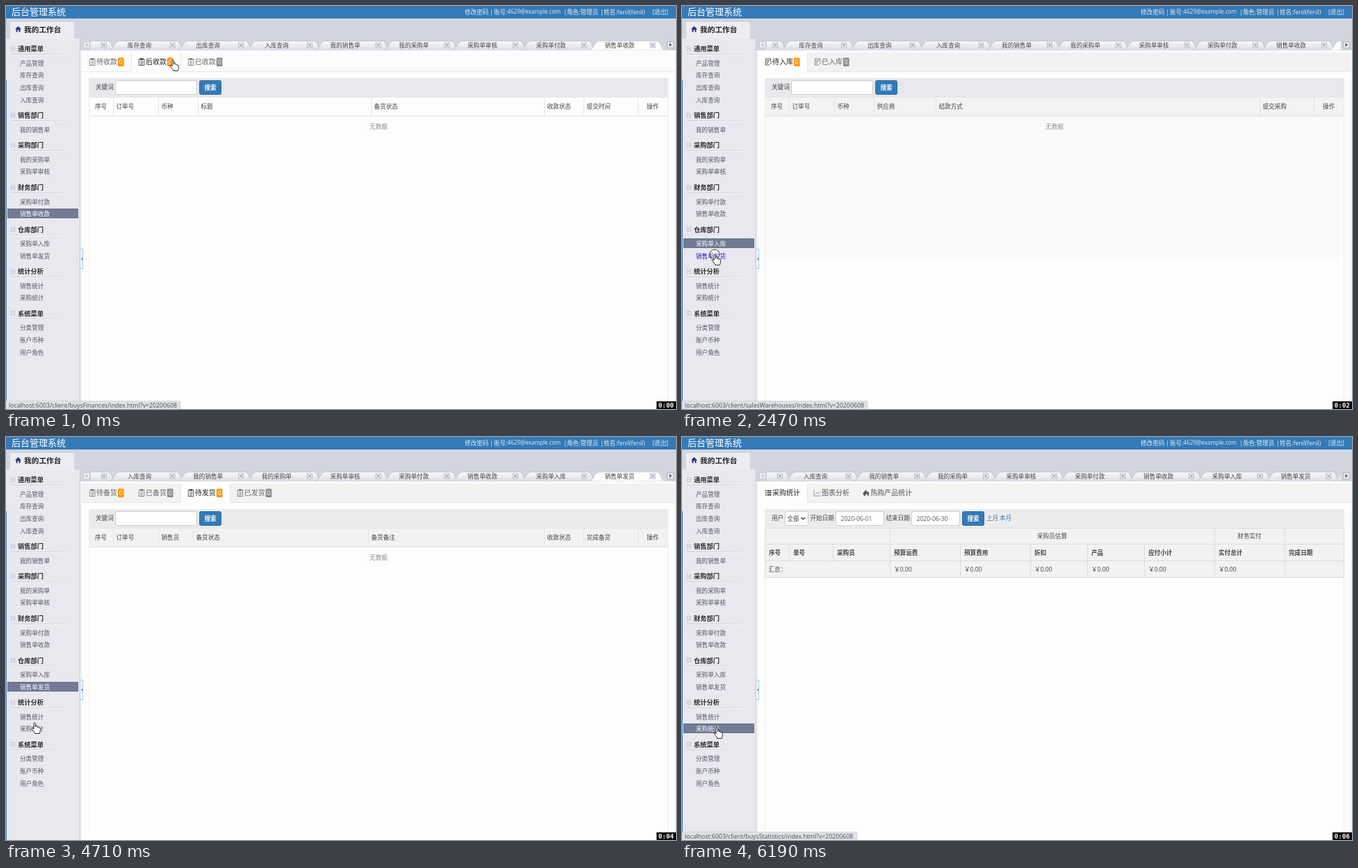
Recreate the animation shown at these times as an HTML page. Size 964 by 581 pixels, loop 6.29 s.

```html
<!DOCTYPE html>
<html lang="zh-CN">
<head>
<meta charset="utf-8">
<title>后台管理系统</title>
<style>
html, body { margin: 0; width: 100%; height: 100%; overflow: hidden; background: #fff; }
svg { display: block; width: 964px; height: 581px; }
text { font-family: "Open Sans", "Noto Sans CJK SC", "Noto Sans CJK", sans-serif; white-space: pre; }
.mono { font-family: "DejaVu Sans Mono", monospace; }
</style>
</head>
<body>
<svg id="stage" viewBox="0 0 964 581">
  <defs>
    <linearGradient id="tabFill" x1="0" y1="0" x2="0" y2="1">
      <stop offset="0" stop-color="#fafafc"/><stop offset="1" stop-color="#dcdee6"/>
    </linearGradient>
    <linearGradient id="rule">
      <stop offset="0" stop-color="#c9ccd6"/><stop offset="1" stop-color="#dfe1e8"/>
    </linearGradient>
    <clipPath id="tabClip"><rect x="122" y="47" width="826" height="20"/></clipPath>
  </defs>
  <g id="frame"></g><g id="menu"></g><g id="tabs"></g><g id="page"></g><g id="over"></g>
</svg>
<script>
const LOOP = 6290, PITCH = 98.7, BLUE = '#337ab7', LINE = '#dcdce0';
const $ = id => document.getElementById(id);

const text = (x, y, s, o = {}) => {
  const size = o.size || 8.6;
  return `<text x="${x}" y="${y + size * .37}" font-size="${size}" fill="${o.fill || '#444'}"` +
    ` font-weight="${o.weight || 400}" text-anchor="${o.anchor || 'start'}"${o.cls ? ` class="${o.cls}"` : ''}>${s}</text>`;
};
const rect = (x, y, w, h, fill, extra = '') =>
  `<rect x="${x}" y="${y}" width="${w}" height="${h}" fill="${fill}" ${extra}/>`;
const path = (d, stroke, fill = 'none', w = 1) =>
  `<path d="${d}" stroke="${stroke}" fill="${fill}" stroke-width="${w}"/>`;
const vline = (x, y1, y2, c = LINE) => path(`M${Math.floor(x) + .5} ${y1}V${y2}`, c);
const hline = (y, x1, x2, c = LINE) => path(`M${x1} ${y + .5}H${x2}`, c);

const TICKS = [0, 210, 420, 640, 740, 950, 1170, 1390, 1600, 1820, 2040, 2250, 2470, 2690, 2900, 3110,
  3330, 3540, 3760, 3970, 4070, 4290, 4500, 4710, 4920, 5140, 5240, 5450, 5670, 5880, 6090, 6190];
const last = (list, t) => list.filter(k => k[0] <= t).pop();
const lerp = (list, t) => {
  const a = last(list, t), b = list[list.indexOf(a) + 1] || a;
  const k = b === a ? 0 : (t - a[0]) / (b[0] - a[0]);
  return a.map((v, i) => v + (b[i] - v) * k);
};

const MENU = [
  [62, '通用菜单', ['产品管理', '库存查询', '出库查询', '入库查询']],
  [158, '销售部门', ['我的销售单']],
  [201, '采购部门', ['我的采购单', '采购单审核']],
  [262, '财务部门', ['采购单付款', '销售单收款']],
  [322.5, '仓库部门', ['采购单入库', '销售单发货']],
  [383, '统计分析', ['销售统计', '采购统计']],
  [443.5, '系统菜单', ['分类管理', '账户币种', '用户角色']]
];
const TITLES = MENU.slice(0, 6).flatMap(g => g[2]);

// Timeline: time, value
const SELECTED = [[0, '销售单收款'], [2250, '采购单入库'], [2690, '销售单发货'], [5140, '销售统计'], [5670, '采购统计']];
const HOVER = [[0, ''], [2040, '采购单入库'], [2250, ''], [2470, '销售单发货'], [2690, ''], [4920, '销售统计'],
  [5140, ''], [5450, '采购统计'], [5670, '']];
const PAGE = [[0, 'collect', 1], [740, 'collect', 2], [2250, 'stock', 0], [2900, 'ship', 0], [3760, 'ship', 1],
  [4290, 'ship', 2], [5140, 'sales', 0], [5880, 'buys', 0]];
const STATUS = [[0, 'buysFinances'], [1600, 'buysWarehouses'], [2470, 'salesWarehouses'], [2900, 'salesStatistics'],
  [3540, ''], [4920, 'salesStatistics'], [5450, 'buysStatistics']];
const SCROLL = [[0, 0], [2250, 0], [2470, 6.5], [2690, PITCH], [3110, PITCH], [3330, 137.5], [3540, 2 * PITCH]];
const OPENED = [[0, 9], [2250, 10], [2900, 11], [5140, 12], [5880, 13]];
const POINTER = [[0, 239, 78], [420, 265, 78], [740, 303, 78], [1170, 298, 84], [1390, 215, 190], [1600, 98, 310],
  [1820, 51, 345], [2040, 46, 341], [2250, 46, 345], [2470, 46, 358], [2690, 46, 358], [2900, 50, 385],
  [3110, 170, 250], [3330, 286, 138], [3540, 220, 78], [3970, 220, 78], [4070, 285, 78], [4290, 288, 78],
  [4500, 160, 260], [4710, 40, 412], [4920, 40, 403], [5240, 40, 403], [5450, 38, 419], [5670, 38, 419], [6190, 49, 419]];
const SHAPE = [[0, 'hand'], [1390, 'arrow'], [2040, 'hand'], [3110, 'arrow'], [3540, 'hand'], [4500, 'arrow'], [4710, 'hand']];

function drawFrame() {
  let s = rect(0, 0, 964, 581, '#fdfdfd') + rect(0, 18, 964, 47, '#d2d5df') + rect(0, 0, 964, 18, BLUE);
  s += text(8, 8, '后台管理系统', { size: 13, fill: '#fff' });
  const top = (x, v, size) => text(x, 8.5, v, { fill: '#e4eef7', size });
  s += top(660, '修改密码') + top(696, '|') + top(702, '账号:') + top(721.5, '4629@example.com', 8.1) + top(802, '|') +
    top(807, '角色:管理员') + top(855, '|') + top(860, '姓名:fenil(fenil)') + top(930, '[退出]');
  s += rect(0, 47, 107, 534, '#e8e8ee') + path('M6 48V25q0-2 2-2H96q2 0 2 2V48Z', 'none', '#ececf1');
  s += path('M13 33.5L17.5 29L22 33.5H20.5V37.5H18.5V34.5H16.5V37.5H14.5V33.5Z', 'none', '#27357c');
  s += text(26, 34, '我的工作台', { size: 10.7, weight: 700, fill: '#222' });
  s += rect(0, 107, 1, 474, '#3d80bd') + vline(106, 47, 581, '#c6c9d3') + vline(108, 67, 581, '#ececef');
  s += rect(106.5, 350.5, 4, 28, '#fff', 'stroke="#a9c4e2"') + path('M110 362.5L108 364.5L110 366.5Z', 'none', BLUE);
  return s + vline(962, 67, 581, '#eee');
}

function drawMenu(chosen, hover) {
  let s = '';
  for (const [y, name, items] of MENU) {
    s += rect(7.5, y - 3, 5, 5, '#f5f5f8', 'stroke="#b4b8c6" stroke-width=".8"') + path(`M8.8 ${y - .5}h2.5`, '#8088a0', 'none', .8);
    s += text(17, y, name, { size: 9.25, weight: 700, fill: '#2a2b30' }) + rect(7, y + 7, 82, 1, 'url(#rule)') +
      rect(7, y + 8, 82, 1, '#f3f3f7');
    items.forEach((item, i) => {
      const iy = y + 20.5 + i * 17.7, on = item === chosen;
      if (on) s += rect(2.5, Math.round(iy) - 7.5, 101, 13, '#717b95', 'stroke="#69728c"');
      s += text(20, iy, item, { fill: on ? '#fff' : item === hover ? '#2020b8' : '#535769' });
    });
  }
  return s;
}

function drawTabs(scroll, count, chosen) {
  let s = '';
  const tab = i => {
    const c = 192 + PITCH * (i - 1) - scroll, on = TITLES[i] === chosen;
    if (c < 0 || c > 1020) return '';
    const d = `M${c - 43} 63.5C${c - 36} 62 ${c - 37} 50.5 ${c - 28} 50.5H${c + 53}C${c + 60} 50.5 ${c + 58} 62 ${c + 65} 63.5`;
    return path(d, on ? '#c9ccd6' : '#b9bdca', on ? '#fdfdfd' : 'url(#tabFill)', .8) + text(c, 57, TITLES[i], { anchor: 'middle' }) +
      rect(c + 44, 53, 7, 7, '#f4f4f8', 'stroke="#a5aabb" stroke-width=".8"') +
      path(`M${c + 45.7} 54.7l3.6 3.6m0-3.6l-3.6 3.6`, '#6a7085', 'none', 1);
  };
  const order = [...Array(count).keys()].sort((a, b) => (TITLES[a] === chosen) - (TITLES[b] === chosen));
  s += rect(107, 63, 857, 4, '#fdfdfd') + hline(63, 107, 964, '#cfd1da');
  s += `<g clip-path="url(#tabClip)">${order.map(tab).join('')}</g>`;
  const button = (x, dir, edge, c) => rect(x + .5, 51.5, 9, 9, '#e9eaf0', `stroke="${edge}" stroke-width=".8"`) +
    path(`M${x + 5 + 2 * dir} 56l${-3.5 * dir} -2.7v5.4Z`, 'none', c);
  return s + button(111, -1, '#c4c8d2', '#c0c4cf') + button(951, 1, '#a8adbd', '#4f576e');
}

const ICONS = {
  clip: (x, c) => path(`M${x} 76.5h7.5v9h-7.5ZM${x + 2} 75.5h3.5v2h-3.5ZM${x + 2} 80h4m-4 2h4m-4 2h3`, c, 'none', .75),
  edit: (x, c) => path(`M${x} 76h7v4m-2 5h-5v-9m1.5 2.5h4m-4 2h3m-3 2h2m2 2l4-4.5`, c, 'none', .8),
  list: (x, c) => path(`M${x} 77.5h1.5m1 0h6m-8.5 3h1.5m1 0h6m-8.5 3h1.5m1 0h6`, c, 'none', 1.4),
  chart: (x, c) => path(`M${x} 76v9h9.5M${x + 1.5} 83l2.5-3l2 1.5l3.5-4`, c, 'none', .8),
  fire: (x, c) => path(`M${x + 4} 75.5c1 3 2 2 2.4 4c.5-.4.8-1.2.8-1.8c2 2.5 3 5.4 0 7.8c.7-2-1-2.5-1.7-4.2c-1 2-2.5 2-1.7 4.2c-4-2-4-4.2-1.7-6.4c1.2-1.2 1.8-2 1.9-3.6Z`, 'none', c)
};

const VIEWS = {
  collect: {
    row: '#fcfcfc', bar: '#e8e8ed', head: '#fdfdfd', icon: 'clip',
    tabs: [['待收款', 1], ['后收款', 1], ['已收款', 0]],
    cols: [[154, '订单号'], [219, '币种'], [276, '标题'], [525, '备货状态'], [774, '收款状态'], [831, '提交时间']]
  },
  stock: {
    row: '#f2f2f3', bar: '#e8e8ed', head: '#f3f3f3', icon: 'edit',
    tabs: [['待入库', 1], ['已入库', 0]],
    cols: [[154, '订单号'], [219, '币种'], [276, '供应商'], [365, '结款方式'], [831, '提交采购']]
  },
  ship: {
    row: '#f2f2f2', bar: '#ebebeb', head: '#f2f2f2', icon: 'clip',
    tabs: [['待备货', 1], ['已备货', 0], ['待发货', 1], ['已发货', 0]],
    cols: [[154, '订单号'], [219, '销售员'], [269, '备货状态'], [521, '备货备注'], [774, '收款状态'], [831, '提交时间']]
  },
  sales: {
    lead: '销量统计', hot: '热售产品统计', bg: '#f3f3f3', zero: '0.00', first: 3, shift: 0, groups: [[260, 571, '销售员估算'], [571, 867, '财务实收']],
    cols: [[119, '序号'], [154, '单号'], [200, '业务员'], [260, '预算运费'], [333, '预算费用'], [406, '折扣'], [452, '产品'],
      [498, '应收小计'], [571, '收款总计'], [645, '实付运费'], [719, '收款费用'], [793, '实收总计'], [867, '完成日期']]
  },
  buys: {
    lead: '采购统计', hot: '热购产品统计', bg: '#fdfdfd', zero: '￥0.00', first: 3, shift: 17, groups: [[299, 766, '采购员估算'], [766, 867, '财务实付']],
    cols: [[119, '序号'], [154, '单号'], [217, '采购员'], [299, '预算运费'], [400, '预算费用'], [501, '折扣'], [583, '产品'],
      [665, '应付小计'], [766, '实付总计'], [867, '完成日期']]
  }
};

const field = (x, w, fill = '#fff') => rect(x + .5, 107.5, w - 1, 20, fill, 'rx="2" stroke="#ccccd2"');
const search = x => rect(x + .5, 107.5, 31, 20, BLUE, 'rx="2" stroke="#2e6da4"') +
  text(x + 16, 117.5, '搜索', { fill: '#fff', weight: 700, anchor: 'middle' });
const frameLines = () => vline(119, 104, 569, '#ececee') + vline(952, 104, 569, '#ececee');

function pageRow(fill, active, on = '#fefefe') {
  const x = 109 + active * 71;
  return rect(109, 67, 853, 27, fill) + hline(94, 109, 962, '#e8e8e8') +
    rect(x, 67, 71.5, 28, on) + vline(x + 71, 67, 94, '#e6e6e6') + (active ? vline(x, 67, 94, '#e6e6e6') : '');
}

function drawList(v, kind, active) {
  let s = pageRow(v.row, active);
  if (kind === 'collect' && active === 2) s += rect(180, 67, 71, 27, '#f1f1f2');
  v.tabs.forEach(([name, hot], i) => {
    const x = 120 + i * 70.9, c = i === active ? '#222' : '#666';
    s += ICONS[v.icon](x + .5, c) + text(x + 10, 80.5, name, { size: 10, fill: c });
    s += rect(x + 41, 74.5, 8.6, 12.5, hot ? '#ff9800' : '#8e8e8e', 'rx="1.5"') +
      text(x + 45.3, 81, '0', { size: 8.6, fill: '#fff', anchor: 'middle' });
  });
  s += rect(119, 104, 834, 27, v.bar) + text(129, 117, '关键词') + field(157, 118) + search(278);
  s += rect(119, 131, 834, 28, v.head);
  if (kind === 'stock') s += rect(119, 159, 828, 206, '#fafafa');
  s += hline(131, 119, 953, '#e6e6e9') + hline(158, 119, 953, '#dedee3') + frameLines() + text(128, 144.5, '序号');
  for (const [x, name] of v.cols) {
    const label = kind === 'ship' && active === 2 && x === 831 ? '完成备货' : name;
    s += vline(x, 132, 158, '#e4e4e8') + text(x + 4.5, 144.5, label);
  }
  s += vline(909, 132, 158, '#e4e4e8') + text(922, 144.5, '操作');
  return s + text(536, 173.5, '无数据', { fill: '#8c8c8c', anchor: 'middle' });
}

function drawStats(v, kind) {
  const d = v.shift, full = kind === 'buys', edge = v.cols[v.first][0];
  let s = pageRow('#f3f3f3', 0, v.bg) + rect(119, 104, 834, 465, v.bg) + rect(119, 104, 834, 27, '#ececec');
  s += ICONS.list(120, '#222') + text(130, 80.5, v.lead, { size: 10, fill: '#222' }) +
    ICONS.chart(190, '#888') + text(201, 80.5, '图表分析', { size: 10, fill: '#555' }) +
    ICONS.fire(260, '#555') + text(271, 80.5, v.hot, { size: 10, fill: '#555' });
  s += text(129, 117, '用户') + field(148, 17 + d) + path(`M${154.5 + d} 116l2.7 2.7l2.7-2.7`, '#333', 'none', 1.3);
  if (full) s += text(151.5, 118, '全部');
  s += text(167.5 + d, 117, '开始日期') + field(204 + d, 70) + text(276.5 + d, 117, '结束日期') +
    field(313 + d, 70, full ? '#fff' : '#eeeeee');
  if (full) s += text(228.5, 118, '2020-06-01', { fill: '#555' }) + text(337.5, 118, '2020-06-30', { fill: '#555' });
  s += search(386 + d) + text(421 + d, 117, '上月', { fill: BLUE }) + text(440 + d, 117, '本月', { fill: BLUE });
  s += rect(119, 131, 834, 72, '#f2f2f2') + frameLines();
  [131, 154, 178, 202].forEach(y => s += hline(y, 119, 953, '#dcdcdc'));
  for (const [a, b, name] of v.groups) s += vline(a, 131, 155) + text((a + b) / 2, 142.5, name, { anchor: 'middle' });
  s += vline(867, 131, 155) + text(124.5, 190.5, '汇总：');
  v.cols.forEach(([x, name], i) => {
    s += vline(x, 155, x < edge ? 179 : 203) + text(x + 6, 167, name, { weight: 700 });
    if (x >= edge && i < v.cols.length - 1) s += text(x + 6, 190.5, v.zero);
  });
  return s + vline(119, 131, 203) + vline(952, 131, 203);
}

function drawPointer(t) {
  const [, x, y] = lerp(POINTER, t);
  const hand = 'M0 1.2C0-.4 2.4-.4 2.4 1.2V6C3-.0 5 5.2 5 6.6C5.4 5.7 7.4 6 7.4 7.4C7.8 6.7 9.4 7 9.4 8.4V11.5C9.4 13 8.4 14 8.2 15.5H1.8C1.5 13.5-1 11.5-2.6 9.3C-3.4 7.8-1.6 7-.6 8.4L0 9Z';
  const arrow = 'M0 0V11.5L2.7 9L4.6 13.6L6.7 12.7L4.8 8.3H8.4Z';
  const isHand = last(SHAPE, t)[1] === 'hand';
  const ring = t === 2470 ? `<circle cx="${x + 1}" cy="${y}" r="7" fill="#fff" fill-opacity=".35" stroke="#333" stroke-width=".9"/>` : '';
  return ring + `<g transform="translate(${x} ${y})">${path(isHand ? hand : arrow, '#111', '#fff', .9)}</g>`;
}

function drawOver(t) {
  let s = '';
  const dir = last(STATUS, t)[1];
  if (dir) {
    const w = { buysFinances: 251, buysWarehouses: 266, salesWarehouses: 267, salesStatistics: 253, buysStatistics: 252 }[dir];
    s += path(`M0 581V569.5H${w - 2}q2 0 2 2V581`, '#cfd2d8', '#dfe1e6', .8) +
      text(4, 576, `localhost:6003/client/${dir}/index.html?v=20200608`, { size: 8.75, fill: '#4a4d52' });
  }
  s += rect(936, 570, 28, 11, '#000') +
    text(949.7, 575.3, '0:0' + Math.floor(t / 1000), { size: 9.4, weight: 700, fill: '#fff', anchor: 'middle', cls: 'mono' });
  return s + drawPointer(t);
}

let shown = -1;
function render(now) {
  const ms = now % LOOP, t = TICKS.filter(k => k <= ms).pop();
  if (t === shown) return;
  shown = t;
  const chosen = last(SELECTED, t)[1], [, kind, active] = last(PAGE, t), view = VIEWS[kind];
  $('menu').innerHTML = drawMenu(chosen, last(HOVER, t)[1]);
  $('tabs').innerHTML = drawTabs(lerp(SCROLL, t)[1], last(OPENED, t)[1], chosen);
  $('page').innerHTML = view.tabs ? drawList(view, kind, active) : drawStats(view, kind);
  $('over').innerHTML = drawOver(t);
}

$('frame').innerHTML = drawFrame();
const start = performance.now();
function loop() {
  render(performance.now() - start);
  requestAnimationFrame(loop);
}
loop();
</script>
</body>
</html>
```
